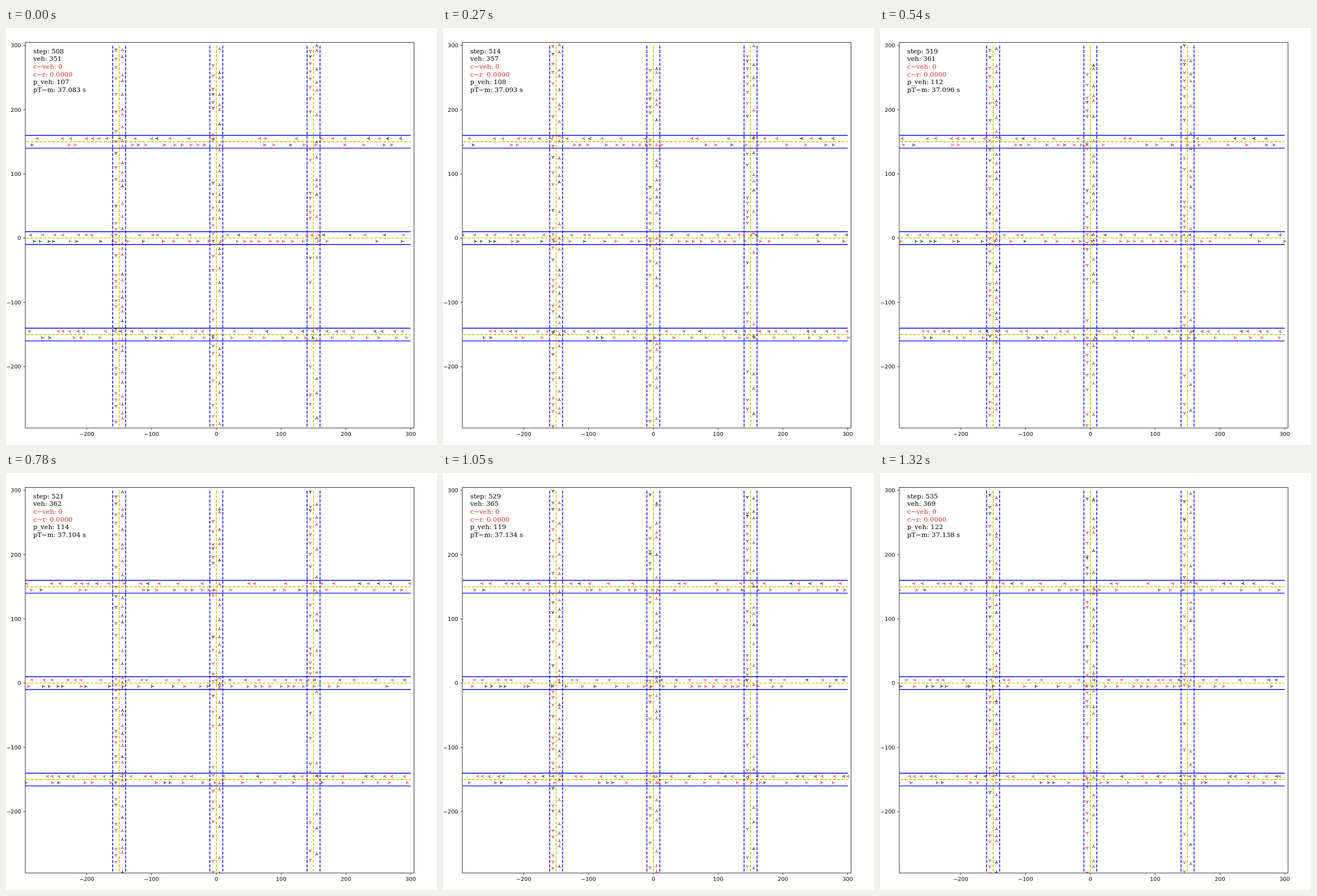
These frames come from a looping animation (760 px wide and 736 px high, 1720 ms). An HTML page:

```html
<!DOCTYPE html>
<html lang="en">
<head>
<meta charset="utf-8">
<title>Traffic grid</title>
<style>
  html, body { margin: 0; width: 100%; height: 100%; overflow: hidden; background: #fff; }
  svg { display: block; width: 760px; height: 736px; }
  .tick { font: 9.5px "DejaVu Sans", sans-serif; }
  .hud { font: 11.5px "DejaVu Serif", serif; }
</style>
</head>
<body>
<svg id="stage" viewBox="0 0 760 736">
  <defs><clipPath id="inside"><rect x="34" y="25.5" width="685.5" height="680.5"/></clipPath></defs>
</svg>
<script>
const LOOP = 1720, FIRST_STEP = 508, STEP_MS = 48.9;
const REACH = 300, ROADS = [-150, 0, 150];
const BLUE = "#0808e0", YELLOW = "#bfbf00", RED = "#cd3030";
const stage = document.getElementById("stage");

function add(tag, attrs, parent = stage) {
  const el = document.createElementNS("http://www.w3.org/2000/svg", tag);
  for (const key in attrs) el.setAttribute(key, attrs[key]);
  return parent.appendChild(el);
}
function label(text, x, y, anchor) {
  add("text", { class: "tick", x, y, "text-anchor": anchor }).textContent = text;
}

// Plot units to pixels
const px = u => 370.9 + 1.1425 * u;
const py = u => 370.9 - 1.134 * u;

// Roads: solid edges across, dashed edges down, dashed yellow centres.
const roads = add("g", { "clip-path": "url(#inside)", "stroke-width": 1.43, fill: "none" });
function road(d, stroke, dashed) {
  add("path", { d, stroke, "stroke-dasharray": dashed ? "5.29 2.29" : "none" }, roads);
}
for (const c of ROADS) {
  for (const side of [-10, 0, 10]) {
    const colour = side ? BLUE : YELLOW;
    road(`M${px(-REACH)} ${py(c + side)}H${px(REACH)}`, colour, !side);
    road(`M${px(c + side)} ${py(-REACH)}V${py(REACH)}`, colour, true);
  }
}

const traffic = add("g", { "clip-path": "url(#inside)", fill: "none", "stroke-width": 1.05 });

// Axes
add("rect", { x: 34, y: 25.5, width: 685.5, height: 680.5, fill: "none", stroke: "#000", "stroke-width": 0.8 });
for (let u = -200; u <= REACH; u += 100) {
  const text = String(u).replace("-", "\u2212");
  add("path", { d: `M${px(u)} 706v3.4M34 ${py(u)}h-3.4`, stroke: "#000", "stroke-width": 0.8 });
  label(text, px(u), 720, "middle");
  label(text, 26.5, py(u) + 3.5, "end");
}

// Vehicles: darker ones drive slower (units per step).
const FAST = { colour: RED, speed: 1.29 };
const MEDIUM = { colour: "#7c1c1c", speed: 1.19 };
const SLOW = { colour: "#141414", speed: 1.07 };

let seed = 508;
function random() {
  seed = (seed * 1664525 + 1013904223) % 2 ** 32;
  return seed / 2 ** 32;
}

// Newly arrived vehicles are more often dark.
function pickKind(travelled) {
  const dark = travelled < -240 ? 0.35 : 0.13;
  const r = random();
  return r < dark ? SLOW : r < dark + 0.17 ? MEDIUM : FAST;
}

// Vehicles follow each other at random gaps; southern and western roads are busier.
const cars = [];
function lane(horizontal, centre, side) {
  const dir = horizontal ? -side : side;
  const angle = horizontal ? (dir > 0 ? 0 : 180) : -90 * dir;
  const meanGap = 22 + centre / 40, minGap = 7;
  let travelled = -REACH - 36 + random() * meanGap;
  while (travelled < REACH) {
    const { colour, speed } = pickKind(travelled);
    const el = add("path", { d: "M0 0H3.2M-1.6-2.56L0 0L-1.6 2.56", stroke: colour }, traffic);
    cars.push({ el, horizontal, at: centre + 5 * side, dir, angle, travelled, speed });
    travelled += minGap - Math.log(1 - random()) * (meanGap - minGap);
  }
}
for (const horizontal of [true, false])
  for (const centre of ROADS)
    for (const side of [-1, 1]) lane(horizontal, centre, side);

// Readout
const hud = Array.from({ length: 6 }, (_, i) =>
  add("text", { class: "hud", x: 48, y: 44.5 + 13.7 * i, fill: i === 2 || i === 3 ? RED : "#000" }));

// Times at which the picture changes
const CHANGES = [0, 150, 270, 390, 540, 660, 790, 910, 1050, 1170, 1320];

// Key points: steps passed, vehicles, finished vehicles, mean trip time
const KEYS = [
  [0, 351, 107, 37.083],
  [3, 354, 107, 37.083],
  [8, 359, 109, 37.099],
  [11, 361, 112, 37.096],
  [19, 365, 118, 37.127],
  [24, 366, 121, 37.145],
  [27, 369, 122, 37.138]
];
function readout(steps) {
  const next = Math.max(1, KEYS.findIndex(key => key[0] >= steps));
  const a = KEYS[next - 1], b = KEYS[next];
  const part = (steps - a[0]) / (b[0] - a[0]);
  return a.map((value, i) => value + (b[i] - value) * part);
}

function draw(time) {
  const steps = Math.round(CHANGES.findLast(t => t <= time) / STEP_MS);
  for (const { el, horizontal, at, dir, angle, travelled, speed } of cars) {
    const now = travelled + speed * steps;
    const x = px(horizontal ? dir * now : at);
    const y = py(horizontal ? at : dir * now);
    el.setAttribute("transform", `translate(${x} ${y}) rotate(${angle})`);
    el.setAttribute("visibility", Math.abs(now) > REACH + 1 ? "hidden" : "visible");
  }
  const [, vehicles, finished, mean] = readout(steps);
  const lines = [
    `step: ${FIRST_STEP + steps}`, `veh: ${Math.round(vehicles)}`,
    "c\u2212veh: 0", "c\u2212r: 0.0000",
    `p_veh: ${Math.round(finished)}`, `pT\u2212m: ${mean.toFixed(3)} s`
  ];
  lines.forEach((text, i) => { hud[i].textContent = text; });
}

const start = performance.now();
function tick() {
  draw((performance.now() - start) % LOOP);
  requestAnimationFrame(tick);
}
tick();
</script>
</body>
</html>
```
